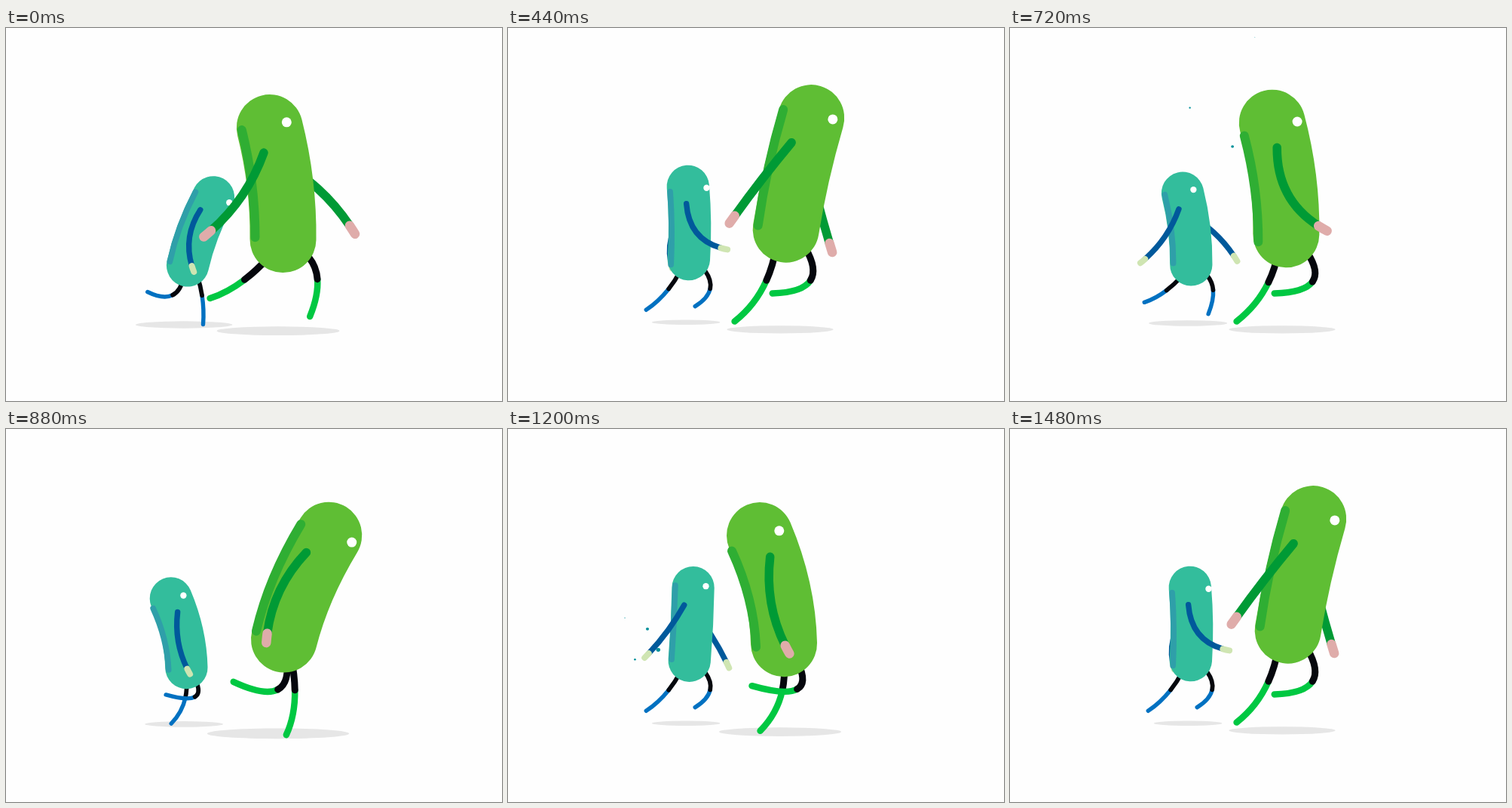
Animation, 658 px wide and 494 px high, one loop 1520 ms. Source, as an HTML page with a canvas:

```html
<!DOCTYPE html>
<html lang="en">
<head>
<meta charset="utf-8">
<title>Walking pair</title>
<style>
html, body { margin: 0; width: 100%; height: 100%; overflow: hidden; background: #fefefe; }
canvas { display: block; }
</style>
</head>
<body>
<canvas id="stage" width="658" height="494"></canvas>
<script>
const ctx = document.getElementById('stage').getContext('2d');
const STEP = 40, LOOP = 1520, CYCLE = 13, TURN = 14;

const BIG = { at: [1, 0, 0], lag: 0, body: '#5fbe34', stripe: '#2fae33',
  arm: '#009a35', hand: '#dfacaa', leg: '#00c842' };
const SMALL = { at: [.64, 5.1, 134.2], lag: 5, body: '#33bd9c', stripe: '#2f9fa9',
  arm: '#00599b', hand: '#cfe5b2', leg: '#0071c1' };

// drops fan out from a point: first angle, turn per drop, first reach, gap
const BURSTS = [
  { start: 440, life: 320, x: 310, y: 120, ease: 2.6, count: 3, fan: 3,
    from: 2.04, turn: 1.4, reach: 33, gap: 42 },
  { start: 1000, life: 360, x: 222, y: 280, ease: 5, count: 5, fan: 2,
    from: 2.75, turn: .85, reach: 25, gap: 17 }
];

const mix = (a, b, t) => a + (b - a) * t;

// a mean with one swing per cycle and one per step
function wave(q, mean, c1, s1, c2 = 0, s2 = 0) {
  const a = q / TURN * Math.PI * 2;
  return mean + c1 * Math.cos(a) + s1 * Math.sin(a) + c2 * Math.cos(2 * a) + s2 * Math.sin(2 * a);
}

// the cycle has 14 poses and skips the ninth
function phase(who, i) {
  const p = (i - who.lag + CYCLE) % CYCLE;
  return p < 8 ? p : p + 1;
}

function place([k, x, y]) { ctx.setTransform(k, 0, 0, k, x, y); }

function disc(x, y, rx, ry, color) {
  ctx.fillStyle = color;
  ctx.beginPath();
  ctx.ellipse(x, y, rx, ry, 0, 0, Math.PI * 2);
  ctx.fill();
}

function curve([x0, y0, x1, y1, x2, y2], width, color) {
  ctx.lineWidth = width;
  ctx.strokeStyle = color;
  ctx.beginPath();
  ctx.moveTo(x0, y0);
  ctx.quadraticCurveTo(x1, y1, x2, y2);
  ctx.stroke();
}

function split([x0, y0, x1, y1, x2, y2], t) {
  const ax = mix(x0, x1, t), ay = mix(y0, y1, t);
  const bx = mix(x1, x2, t), by = mix(y1, y2, t);
  const mx = mix(ax, bx, t), my = mix(ay, by, t);
  return [[x0, y0, ax, ay, mx, my], [mx, my, bx, by, x2, y2]];
}

// hangs from the shoulder, reaches dx sideways, bows across its chord
function arm(who, q, x, y, dx, len) {
  const dy = Math.sqrt(len * len - dx * dx);
  const bow = wave(q, 14.8, -34.2, -3.9, 0, -6.4) / len;
  const [sleeve, hand] = split(
    [x, y, x + dx / 2 - dy * bow, y + dy / 2 + dx * bow, x + dx, y + dy], .91);
  curve(sleeve, 11.5, who.arm);
  curve(hand, 12.5, who.hand);
}

function leg(who, v, hipY) {
  const [thigh, shin] = split([
    wave(v, 375, 27, -3), hipY,
    wave(v, 378.8, 56.6, -8.5, -11.4, -5.6), wave(v, 352.8, -7, -2.7, -14.9, 4.5),
    wave(v, 334.8, 66.3, 20.8, 2.1, 8.9), wave(v, 370, 12, 33.3)
  ], wave(v - 11, .43, .06, 0));
  curve(shin, 8.5, who.leg);
  curve(thigh, 9, '#05070d');
}

function shadow(who, i) {
  place(who.at);
  const w = wave(phase(who, i), 84.7, 0, 0, -3.3, 15.2);
  disc(361, 398.7 + (w - 67) * .17, w, w * .073, '#e6e6e6');
}

function walker(who, i) {
  const q = phase(who, i);
  const lean = wave(q, 5.6, -17.7, -48.9, -5.1, -1.3);
  const bx = wave(q, 367.5, 0, -1.5), by = wave(q, 279.3, 4.1, 7.5, -3.3, 10.3);
  const tx = 367 + lean, ty = by - 151 + (lean - 8) ** 2 / 215;
  const cx = (tx + bx) / 2 - (lean - 18) * .28, cy = (ty + by) / 2;
  const low = wave(q, -1.3, -4.9, 5.8, 3.3, -4.6), high = wave(q, 3, 0, 18);
  const sx = wave(q, 363.7, -15, -26, -6.7), sy = by - 115;
  const len = wave(q, 132, 5, 0);

  place(who.at);
  arm(who, q, sx + 18, sy + 10, wave(q, 15.4, 79, 23, 8.6, 9), len + 5);
  leg(who, q, by + 24);
  leg(who, q + TURN / 2, by + 24);
  curve([bx, by, cx, cy, tx, ty], 88, who.body);
  curve([bx - 37, by + low, cx - 38, cy + (low + high) / 2, tx - 37, ty + high], 12, who.stripe);
  disc(tx + wave(q, 28.5, -8.5, -3.8, 2.5, -3.1), ty + wave(q, 0, -7.2, -8), 6.5, 6.5, '#fff');
  arm(who, q, sx, sy, wave(q, -17.8, -76.2, 34.5, 14.3, -13.3), len);
}

function burst(b, t) {
  const a = (t - b.start) / b.life;
  if (a <= 0 || a >= 1) return;
  const e = 1 - (1 - a) ** b.ease;
  for (let k = 0; k < b.count; k++) {
    const r = 4.2 - .7 * k - 2.6 * a;
    if (r <= 0) continue;
    const angle = b.from + b.turn * (k % b.fan), d = (b.reach + b.gap * k) * e;
    disc(b.x + d * Math.cos(angle), b.y + d * Math.sin(angle) + 10 * a * a, r, r * .9, '#00909a');
  }
}

function draw(now) {
  const i = Math.floor((now % LOOP) / STEP);
  ctx.setTransform(1, 0, 0, 1, 0, 0);
  ctx.fillStyle = '#fefefe';
  ctx.fillRect(0, 0, 658, 494);
  ctx.lineCap = 'round';
  shadow(SMALL, i);
  shadow(BIG, i);
  BURSTS.forEach(b => burst(b, i * STEP));
  walker(SMALL, i);
  walker(BIG, i);
}

const begin = performance.now();
function tick() {
  draw(performance.now() - begin);
  requestAnimationFrame(tick);
}
tick();
</script>
</body>
</html>
```
